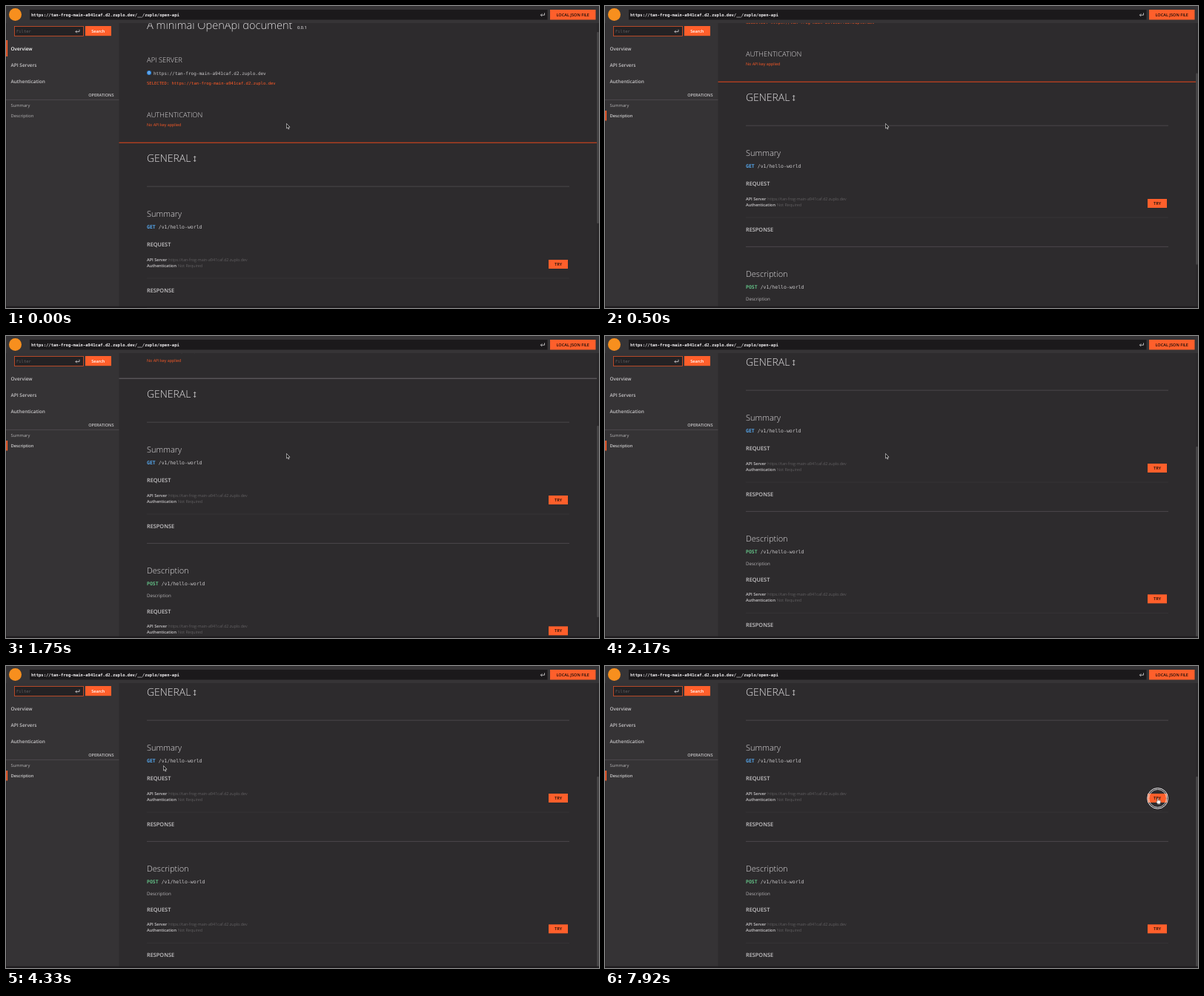
Write an HTML page that moves like this. It is 800 px wide and 407 px high and loops after 8 s.

```html
<!DOCTYPE html>
<html lang="en">
<head>
<meta charset="utf-8">
<title>API explorer</title>
<style>
  html, body { margin: 0; width: 100%; height: 100%; overflow: hidden; background: #2d2b2d; }
  svg { display: block; width: 100vw; height: 100vh; }
  text { font-family: "Open Sans", sans-serif; text-rendering: geometricPrecision; fill: #c8c6c8; white-space: pre; }
  .semi { font-weight: 600; }
  .mono, .mono text { font-family: "DejaVu Sans Mono", monospace; }
  .title { font-size: 14.6px; font-weight: 300; fill: #e2e0e2; }
  .group { font-size: 13.95px; font-weight: 300; fill: #e2e0e2; }
  .heading { font-size: 11px; font-weight: 300; fill: #e0dee0; }
  .section { font-size: 9.4px; font-weight: 300; fill: #e0dee0; }
  .part { font-size: 7.35px; font-weight: 600; }
  .small { font-size: 5.55px; }
  .nav { font-size: 6.45px; font-weight: 600; }
  .item { font-size: 5.75px; }
  .path { font-size: 6.53px; }
  .faint { fill: #7c7a7c; font-weight: 300; }
  .orange { fill: #ff5a26; }
  .button { fill: #ff5f2b; }
  .onButton { fill: #140d0a; font-weight: 600; }
  .rule { stroke: #524f52; stroke-width: .8; }
  .thinRule { stroke: #3b393b; stroke-width: .7; }
  .icon { fill: none; stroke: #d8d6d8; stroke-width: .8; }

  .page, .thumb, .divider, .onOverview, .onDescription, .overview, .description,
  .pointer, .arrow, .hand, .ring { animation: 8s linear infinite; }

  .page { animation-name: page; }
  @keyframes page {
    0%, 1% { transform: translateY(0); animation-timing-function: cubic-bezier(.333, .667, .667, 1); }
    14%, 22.2% { transform: translateY(-127px); animation-timing-function: cubic-bezier(.333, .667, .667, 1); }
    26.8%, 100% { transform: translateY(-170px); }
  }
  .thumb { animation-name: thumb; }
  @keyframes thumb {
    0%, 1% { transform: translateY(0); animation-timing-function: cubic-bezier(.333, .667, .667, 1); }
    14%, 22.2% { transform: translateY(86px); animation-timing-function: cubic-bezier(.333, .667, .667, 1); }
    26.8%, 100% { transform: translateY(114px); }
  }
  .divider { animation-name: divider; stroke-width: 1; }
  @keyframes divider {
    0%, 13.5% { stroke: #e8491c; }
    15.5%, 100% { stroke: #6a686a; }
  }
  .onOverview { animation-name: leave; animation-timing-function: step-end; }
  .onDescription { animation-name: enter; animation-timing-function: step-end; }
  @keyframes leave { 0% { opacity: 1; } 4.2%, 100% { opacity: 0; } }
  @keyframes enter { 0% { opacity: 0; } 4.2%, 100% { opacity: 1; } }
  .overview { animation-name: dim; animation-timing-function: step-end; }
  .description { animation-name: brighten; animation-timing-function: step-end; }
  @keyframes dim { 0% { fill: #fff; } 4.2%, 100% { fill: #c8c6c8; } }
  @keyframes brighten { 0% { fill: #b4b2b4; } 4.2%, 100% { fill: #fff; } }

  .pointer { animation-name: pointer; animation-timing-function: ease-in-out; }
  @keyframes pointer {
    0%, 42% { transform: translate(378px, 158px); }
    51.5%, 55% { transform: translate(212px, 134px); }
    62% { transform: translate(222px, 134px); }
    71.5%, 77% { transform: translate(264px, 131px); }
    86.5%, 100% { transform: translate(745px, 177.5px); }
  }
  .arrow { animation-name: arrow; animation-timing-function: step-end; }
  .hand { animation-name: hand; animation-timing-function: step-end; }
  @keyframes arrow { 0% { opacity: 1; } 86%, 100% { opacity: 0; } }
  @keyframes hand { 0% { opacity: 0; } 86%, 100% { opacity: 1; } }
  .ring { animation-name: ring; animation-timing-function: step-end; }
  @keyframes ring { 0% { opacity: 0; } 97%, 100% { opacity: 1; } }
</style>
</head>
<body>
<svg viewBox="0 0 800 407" preserveAspectRatio="none">
  <defs>
    <path id="enter" class="icon" d="M5.5 -2V.8H.4M2.2 -1L.4 .8L2.2 2.6"/>
    <g id="request">
      <text class="part" x="190" y="324.4">REQUEST</text>
      <text class="small semi" x="190" y="343.8">API Server</text>
      <text class="small faint" x="219.3" y="343.8">https://tan-frog-main-a941caf.d2.zuplo.dev</text>
      <text class="small semi" x="190" y="351.8">Authentication</text>
      <text class="small faint" x="232" y="351.8">Not Required</text>
      <rect class="button" x="732" y="342" width="26" height="12"/>
      <text class="small onButton" x="745" y="350" text-anchor="middle">TRY</text>
      <path class="thinRule" d="M190 367H760"/>
      <text class="part" x="190" y="386">RESPONSE</text>
    </g>
  </defs>

  <rect width="800" height="407" fill="#2d2b2d"/>

  <g class="page">
    <text class="title" x="190" y="30.8">A minimal OpenApi document</text>
    <text class="small semi" x="393" y="31">0.0.1</text>

    <text class="section" x="190" y="76.4">API SERVER</text>
    <circle cx="193" cy="90" r="2.2" fill="#fff" stroke="#2f86dd" stroke-width="1.6"/>
    <circle cx="193" cy="90" r="1" fill="#2f86dd"/>
    <text class="mono" font-size="6.01" x="199" y="92.5">https://tan-frog-main-a941caf.d2.zuplo.dev</text>
    <text class="mono small orange" x="190" y="105.8">SELECTED: https://tan-frog-main-a941caf.d2.zuplo.dev</text>

    <text class="section" x="190" y="150.4">AUTHENTICATION</text>
    <text class="orange" font-size="5.35" x="190" y="162">No API key applied</text>
    <path class="divider" d="M152 184.2H797"/>

    <text class="group" x="190" y="210.2">GENERAL</text>
    <path class="icon" d="M253.2 204L254.7 202.5L256.2 204M254.7 202.5V209.5M253.2 208L254.7 209.5L256.2 208"/>
    <path class="rule" d="M190 243.2H760"/>

    <text class="heading" x="190" y="283.6">Summary</text>
    <text class="mono path" x="190" y="299.5"><tspan font-weight="700" fill="#56a8ee">GET</tspan> /v1/hello-world</text>
    <use href="#request"/>
    <path class="rule" d="M190 406.4H760"/>

    <text class="heading" x="190" y="446.6">Description</text>
    <text class="mono path" x="190" y="462.6"><tspan font-weight="700" fill="#62bd85">POST</tspan> /v1/hello-world</text>
    <text font-size="6.15" x="190" y="479.1" style="fill:#b4b2b4">Description</text>
    <use href="#request" y="176.3"/>
  </g>

  <rect x="797" y="23" width="3" height="384" fill="#2a282a"/>
  <rect class="thumb" x="797.3" y="35" width="2.4" height="258" rx="1" fill="#4b494b"/>

  <g>
    <rect y="23" width="152.5" height="384" fill="#353335"/>
    <path d="M.3 0V407" stroke="#242224" stroke-width=".6"/>
    <rect x="11.4" y="27.4" width="93" height="13" fill="#242224" stroke="#d85028" stroke-width=".8"/>
    <text class="mono" font-size="5.5" x="14" y="35.7" style="fill:#615f61">Filter</text>
    <use href="#enter" x="93.5" y="33.8"/>
    <rect class="button" x="107" y="27" width="35" height="13.2"/>
    <text class="small semi" x="124.3" y="35.6" text-anchor="middle" style="fill:#fff">Search</text>

    <rect class="button onOverview" x=".3" y="46" width="1.8" height="22"/>
    <rect class="button onDescription" x=".3" y="141" width="1.8" height="13.5"/>
    <text class="nav overview" x="6.5" y="59.6">Overview</text>
    <text class="nav" x="6.5" y="81.8">API Servers</text>
    <text class="nav" x="6.5" y="103.9">Authentication</text>
    <text class="small semi" x="145.5" y="121.5" text-anchor="end">OPERATIONS</text>
    <path class="rule" d="M0 126.4H152.5"/>
    <text class="item" x="6.5" y="136" style="fill:#b4b2b4">Summary</text>
    <text class="item description" x="6.5" y="150">Description</text>
  </g>

  <g>
    <rect width="800" height="23" fill="#363436"/>
    <circle cx="12.5" cy="11.5" r="8.5" fill="#f78f1e"/>
    <rect x="32" y="5" width="698.5" height="13.5" fill="#1b191b"/>
    <text class="mono" font-size="5.54" font-weight="700" x="34" y="13.5" style="fill:#f2f0f2">https://tan-frog-main-a941caf.d2.zuplo.dev/__/zuplo/open-api</text>
    <use href="#enter" x="721" y="11.4"/>
    <rect class="button" x="734" y="5" width="61.5" height="13.5"/>
    <text class="small onButton" x="764.7" y="13.6" text-anchor="middle">LOCAL JSON FILE</text>
  </g>

  <path d="M0 405.8H800" stroke="#1c1a1c" stroke-width="2"/>

  <g class="ring" fill="none" stroke="#f2f0f2">
    <circle cx="745.6" cy="178.4" r="13.9" stroke-width="1"/>
    <circle cx="745.6" cy="178.4" r="12" stroke-width=".8"/>
  </g>
  <g class="pointer" stroke="#dcdadc" stroke-width=".7" stroke-linejoin="round">
    <path class="arrow" fill="#111" d="M.4 .4V7L1.9 5.6L2.9 8L4 7.5L3 5.2H5Z"/>
    <path class="hand" fill="#fff" stroke="#222" stroke-width=".5" d="M0 .8Q.7 -.2 1.3 .8V3.3L4.4 4Q5 4.3 4.8 5.2L4 8.4H.6L-1.6 5.4Q-1.5 4.3 0 5Z"/>
  </g>
</svg>
</body>
</html>
```
